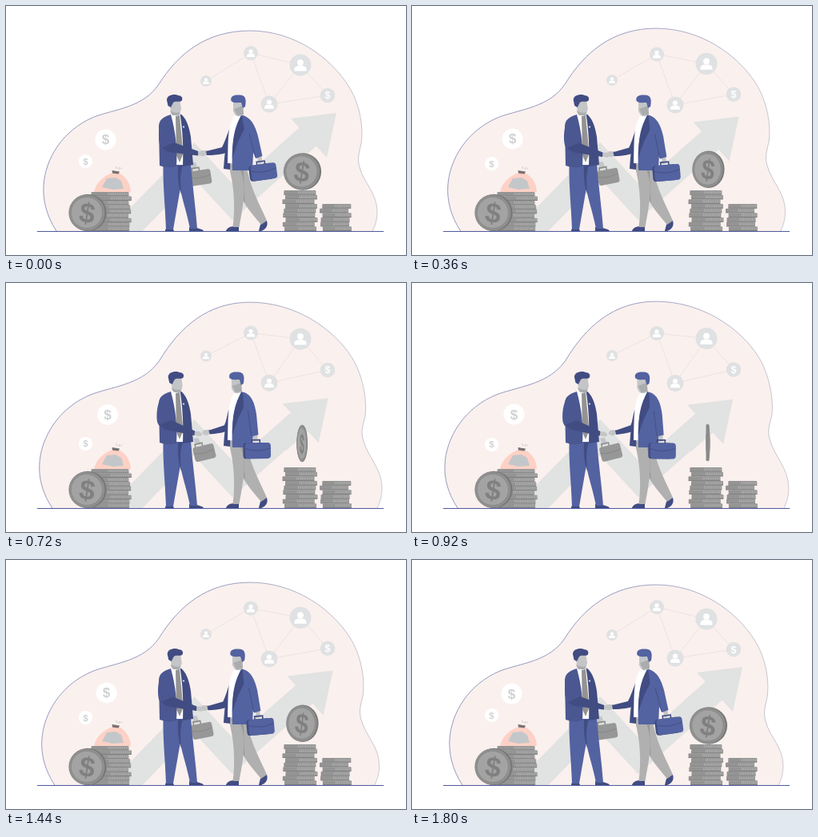
Animation, 500 px wide and 312 px high, one loop 1820 ms. Source, as an HTML page:

```html
<!DOCTYPE html>
<html lang="en">
<head>
<meta charset="utf-8">
<title>Business partnership</title>
<style>
@property --p { syntax: "<number>"; inherits: true; initial-value: 0; }
html, body { margin: 0; width: 100%; height: 100%; overflow: hidden; background: #fff; }
svg { display: block; width: 500px; height: 312px; --p: 0; animation: sway 1820ms cubic-bezier(.4,.2,.6,.8) infinite; }
text { font-family: "Liberation Sans", Arial, sans-serif; font-weight: bold; text-anchor: middle; }

/* 98.9% is 1800 ms: out, back, then one short rest */
@keyframes sway {
  0%, 98.9%, 100% { --p: 0; }
  49.45% { --p: 1; }
}
.blob { fill: #faf0ee; stroke: url(#outline); stroke-width: .9; animation: blob 1820ms cubic-bezier(.4,.2,.6,.8) infinite; }
@keyframes blob {
  0%, 98.9%, 100% { d: path("M63 282C50 262 46 242 47 225C49 192 70 156 110 139C137 129 172 127 191 98C215 60 250 31 305 31C360 31 405 64 428 100C442 122 447 150 444 172C441 185 439 192 442 202C447 222 464 234 464 258C464 268 461 277 458 282"); }
  49.45% { d: path("M57 282C45 264 40 245 41 228C42 195 65 155 108 139C137 129 172 126 192 97C217 55 252 23 305 23C362 23 410 56 433 92C447 115 452 145 450 165C447 178 444 185 447 195C453 218 471 232 471 257C471 267 468 276 465 282"); }
}
.links { fill: none; stroke: #ded9d9; stroke-width: .8; stroke-dasharray: 2 1; animation: links 1820ms cubic-bezier(.4,.2,.6,.8) infinite; }
@keyframes links {
  0%, 98.9%, 100% { d: path("M250 94L306 59L368 74L402 112L329 123L306 59M329 123L368 74"); }
  49.45% { d: path("M250 91L306 63L368 69.5L402 108.5L329 125.5L306 63M329 125.5L368 69.5"); }
}
/* --dx, --dy: drift in px; --a: turn in degrees about --o */
.move {
  transform-origin: var(--o, 0 0);
  transform: translate(calc(var(--dx, 0) * var(--p) * 1px), calc(var(--dy, 0) * var(--p) * 1px)) rotate(calc(var(--a, 0) * var(--p) * 1deg));
}
.spin { transform: translate(370px, calc(207.5px - 7.5px * var(--p))) scaleX(cos(calc(var(--p) * 85deg))); }

.arrow { fill: none; stroke: #e1e2e2; stroke-width: 31; }
.tip { fill: #e1e2e2; }
.node { fill: #dfe1e2; }
.white { fill: #fff; }
.navy { fill: #414c82; }
.suit { fill: #4b5791; }
.blue { fill: #5362a0; }
.skin { fill: #c3c5c6; }
.shade { fill: #aaacad; }
.grey { fill: #979797; }
.pants { fill: #b0b0b0; }
</style>
</head>
<body>
<svg viewBox="0 0 500 312">
  <defs>
    <linearGradient id="outline">
      <stop offset=".5" stop-color="#8b8fb8"/>
      <stop offset="1" stop-color="#c4c4d0"/>
    </linearGradient>
    <clipPath id="sky"><rect width="500" height="282"/></clipPath>
    <g id="person"><circle class="white" cy="-.23" r=".29"/><path class="white" d="M-.57 .55C-.57 .05 -.3 .08 0 .08S.57 .05 .57 .55Z"/></g>
    <g id="coin">
      <circle cx=".8" r="23.3" fill="#777"/>
      <circle cx="-.6" r="22.6" fill="#8f8f8f"/>
      <circle cx="-.6" r="19.6" fill="#a3a3a3" stroke="#8a8a8a" stroke-width=".8"/>
      <text y="12.500" font-size="35" fill="#808080" transform="rotate(9)">$</text>
    </g>
  </defs>

  <path class="blob" d="M63 282"/>

  <path class="links" d="M250 94"/>
  <g id="nodes"></g>

  <g clip-path="url(#sky)">
    <path class="arrow" d="M136 295L235 193.500L284 246.500L365 175"/>
    <g class="move" style="--dx:-12;--dy:12">
      <path class="arrow" d="M350 188L383 159"/>
      <path class="tip" d="M413 134L356 141L401 190Z"/>
    </g>
  </g>

  <g class="move" style="--dx:3;--dy:-3">
    <circle class="white" cx="124.5" cy="167.5" r="13"/>
    <text x="124.5" y="173.5" font-size="17" fill="#cfd1d2">$</text>
  </g>
  <g class="move" style="--dy:8">
    <circle class="white" cx="99.5" cy="194.5" r="8.6"/>
    <text x="99.5" y="198.6" font-size="11.5" fill="#cfd1d2">$</text>
  </g>

  <!-- money bag -->
  <path d="M133 209C123 212 112 222 110 233H156C156 222 148 212 141 209Z" fill="#fdd1c5"/>
  <path d="M120 227L126 216L137 215L144 219L147 229L133 230Z" fill="#c3c7c9"/>
  <path d="M132.500 206L142 207.500L140.500 210.500L133 209.500Z" fill="#77716f"/>
  <path d="M137.500 201L139 204M141 205L142 202M143 204L145 203" stroke="#c9c3c2" stroke-width=".9"/>

  <g id="stacks"></g>
  <use href="#coin" x="101.500" y="259"/>
  <g class="spin"><use href="#coin"/></g>
  <g class="move" style="--dy:-7.500">
    <rect x="367.500" y="184.500" width="4" height="46" rx="1.500" fill="#8a8a8a" style="opacity:calc((var(--p) - .88) * 12)"/>
  </g>

  <!-- left man -->
  <g class="move" style="--o:215px 150px;--a:-5">
    <path class="skin" d="M231 196L237 196L240 204L233 205Z"/>
    <g transform="rotate(-9 244 215)">
      <path d="M234 206V202H243V206" fill="none" stroke="#8a8a8a" stroke-width="1.500"/>
      <rect class="grey" x="230" y="205.500" width="26.500" height="18.500" rx="3"/>
      <path d="M230 213Q243 217 256 213" fill="none" stroke="#858585" stroke-width=".8"/>
    </g>
  </g>
  <path class="navy" d="M199 282C199 279 201 277 208 277L210 282ZM229 282V277H237C239 279 246 279 247 282Z"/>
  <path class="blue" d="M196.500 198H220L218 228L209 280H200C199 250 196 225 196.500 198Z"/>
  <path class="blue" d="M216 198H231C233 225 237 252 239 279H230C226 258 218 236 215.500 216Z"/>
  <path class="navy" d="M215 200H221C217 210 218 222 219 236Q214 222 215 200Z"/>
  <path class="white" d="M207 135L219 135L222 199H212Z"/>
  <path d="M212 138L217 137L221.500 185L217 196L213 187Z" fill="#939393"/>
  <path class="suit" d="M206 136C196 139 191 143 191 151L192 200Q202 204 213 201C214.500 181 212 157 206 136Z"/>
  <path class="navy" d="M217.500 135C225 139 229 151 231 164L234 199L221 201C222 178 221 157 217.500 135Z"/>
  <path class="white" d="M220.500 151L223 150.500L222.500 153Z"/>
  <g class="move" style="--dx:2">
    <path class="skin" d="M205 119H217.500L219 129L217 136L213 137.500L206 135Z"/>
    <path class="shade" d="M205 131Q211 135 217 133L216 137L208 137Z"/>
    <path class="navy" d="M201 118C201 111 211 110 215 112C219 112 222 115 219.500 119C215 121 210 118 208.500 122L206 127L202.500 125Z"/>
  </g>

  <!-- right man -->
  <g class="move" style="--o:287px 150px;--a:-5;--dx:1">
    <path class="skin" d="M252 181L244 181L241 185L246 188L254 186Z"/>
    <path class="navy" d="M287 141C279 149 276 166 270 177L250 182L251 187C266 187 278 185 282 179L290 153Z"/>
  </g>
  <path class="navy" d="M275 282C276 278 281 276 285 276H291V282ZM316 282C317 277 318 273 320 270L326 269C328 275 325 280 319 282Z"/>
  <path class="pants" d="M281 197L301 203C306 230 318 250 326 269L319 274C302 254 286 236 281 197Z"/>
  <path d="M283 203L297 206L298.500 246C288 232 284 220 283 203Z" fill="#999"/>
  <path class="pants" d="M278 198L292 203C301 222 298 243 291.500 277H283.500C287 250 285 225 278 198Z"/>
  <path class="navy" d="M278 160C274 174 273 191 272 204L280 205L283 154Z"/>
  <path class="white" d="M287 136L296 137L291 160L284 197H277C278 172 276 147 287 136Z"/>
  <path class="blue" d="M294 136C305 140 309 150 310 164L308 206H283C282 185 282 164 294 136Z"/>
  <path class="navy" d="M295 136C286 150 283 165 283 190L290 170L300 150Z"/>
  <g class="move" style="--o:300px 148px;--a:8.200">
    <path class="skin" d="M314 187H319L321 196L315 198Z"/>
    <g transform="rotate(-8 321 208)">
      <path d="M315 199V194.500H325V199" fill="none" stroke="#414c82" stroke-width="1.600"/>
      <rect class="navy" x="304" y="198" width="30" height="20" rx="4"/>
      <rect class="blue" x="306.500" y="198" width="32" height="20" rx="4"/>
      <path d="M306 205Q322 211 338 205" fill="none" stroke="#414c82" stroke-width=".8"/>
    </g>
    <path class="blue" d="M295 137C306 139 311 149 315 163L320.500 188L312.500 191L299 163Z"/>
    <path d="M304 160L312 190" stroke="#414c82" stroke-width=".8"/>
  </g>
  <g class="move" style="--dx:-2.500">
    <path class="skin" d="M284 120H296L297 136Q291 140 287 137L284 132Z"/>
    <path class="shade" d="M285 129L296 125L297 136L289 137Z"/>
    <path class="blue" d="M281.500 119C280 113 285 111 291 111.500C299 111 301 116 299 126L296 128L294 121C289 121 284 122 281.500 119Z"/>
  </g>

  <!-- left man's greeting arm -->
  <g class="move" style="--o:197px 150px;--a:5.500;--dx:-1.500">
    <path class="skin" d="M237 182L246 182L250 186L246 188L238 187Z"/>
    <path class="suit" d="M196 142C190 149 190 168 193 176Q195 181 203 182L239 187L240 182L210 172L206 152Z"/>
    <path class="navy" d="M195 178L210 171L240 182V187.500L203 183Z"/>
  </g>

  <path d="M39 282.500H472" stroke="#4f5a9c"/>
</svg>
<script>
const add = (id, html) => document.getElementById(id).insertAdjacentHTML("beforeend", html);

// x, y, radius, vertical drift, dollar sign?
[[306, 59, 9, 4], [368, 74, 13.5, -4.5], [250, 94, 7, -3], [329, 123, 10.5, 2.5], [402, 112, 9.3, -3.5, true]]
  .forEach(([x, y, r, dy, money]) => add("nodes", `<g class="move" style="--dy:${dy}">
    <circle class="node" cx="${x}" cy="${y}" r="${r}"/>` +
    (money ? `<text class="white" x="${x}" y="${y + 4.5}" font-size="12.5">$</text>`
           : `<use href="#person" transform="translate(${x} ${y}) scale(${r})"/>`) + "</g>"));

function stack(x, top, width, count) {
  const h = (282 - top) / count;
  for (let i = 0; i < count; i++) {
    const left = x + 2 + 2 * Math.sin(i * 2.4 + x);
    const y = top + i * h;
    const w = width - 4;
    add("stacks", `<rect x="${left}" y="${y}" width="${w}" height="${h}" rx="1" fill="#949494"/>
      <path d="M${left} ${y + h - .4}h${w}" stroke="#7c7c7c" stroke-width=".8"/>
      <path d="M${left + w * .45} ${y + h / 2 - .3}H${left + w - 1}" stroke="#b8b8b8" stroke-width="${h * .6}" stroke-dasharray=".8 1.4"/>`);
  }
}
stack(106, 233, 51, 9);
stack(345.5, 231, 44, 9);
stack(392, 248, 40, 6);
</script>
</body>
</html>
```
